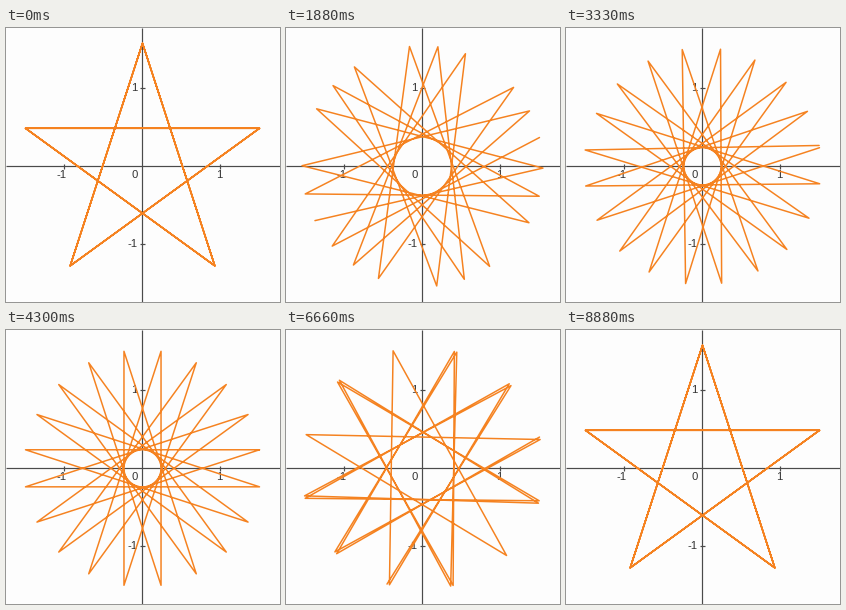
These frames come from a looping animation (274 by 274 pixels, 8.91 s). A matplotlib script:

```python
import numpy as np
import matplotlib.pyplot as plt
from matplotlib.animation import FuncAnimation

SIZE, DPI = 274, 100
LOOP, STEP = 8910, 15            # ms per loop and per frame
POSES = 267                      # distinct poses per loop, each held briefly
UNIT, CX, CY = 78, 136.5, 138.3  # pixels per unit and origin
AX_X, AX_Y = 136, 138            # axis lines, snapped to whole pixels
EDGES, HALF = 20, 1.5            # number of edges, half an edge length
MOVE = 3064                      # ms for one sweep between the two stars
DOWN, UP = 393, 4838             # start of each sweep
WIDE, NARROW = 18.0, 9.0         # {5/2} and {20/9} stars, degrees

plt.rcParams["path.simplify"] = False


def px(points):
    return points * 72 / DPI


def ease(x):
    x = np.clip(x, 0, 1)
    return 2 * x * x if x < 0.5 else 1 - 2 * (1 - x) ** 2


def tilt(t):
    u = ease((t - DOWN) / MOVE) - ease((t - UP) / MOVE)
    return np.radians(WIDE + (NARROW - WIDE) * u)


def star(s):
    """Open chain of equal edges, each turned by 180 degrees + 2s."""
    a = s + np.arange(EDGES + 1) * (np.pi + 2 * s)
    r = UNIT * HALF / np.cos(s)
    return CX + r * np.cos(a), CY - r * np.sin(a)


fig = plt.figure(figsize=(SIZE / DPI, SIZE / DPI), dpi=DPI, facecolor="#fdfdfd")
ax = fig.add_axes([0, 0, 1, 1])
ax.set(xlim=(0, SIZE), ylim=(SIZE, 0))
ax.axis("off")

ink = dict(color="#4a4a4a", lw=px(1.2), solid_capstyle="butt", zorder=1)
ax.plot([AX_X, AX_X], [0, SIZE], **ink)
ax.plot([0, SIZE], [AX_Y, AX_Y], **ink)
for d in (-UNIT, UNIT):
    ax.plot([AX_X + d] * 2, [AX_Y - 2, AX_Y + 3], **ink)
    ax.plot([AX_X - 2, AX_X + 3], [AX_Y + d] * 2, **ink)


def label(x, y, s, ha):
    ax.text(x, y, s, ha=ha, va="center_baseline", family="Liberation Sans",
            size=px(11.2), color="#333333", zorder=2)


label(56, 146.5, "-1", "center")
label(213.5, 146.5, "1", "center")
label(131.5, 146.5, "0", "right")
label(131.5, 59, "1", "right")
label(131.5, 215, "-1", "right")

curve, = ax.plot([], [], color="#f58220", lw=px(1.5), zorder=3,
                 solid_joinstyle="round", solid_capstyle="round")


def update(i):
    pose = int((i + 0.5) * STEP / LOOP * POSES)
    curve.set_data(*star(tilt(pose * LOOP / POSES)))
    return curve,


anim = FuncAnimation(fig, update, frames=LOOP // STEP, interval=STEP,
                     repeat=True, repeat_delay=0, blit=False)
plt.show()
```
